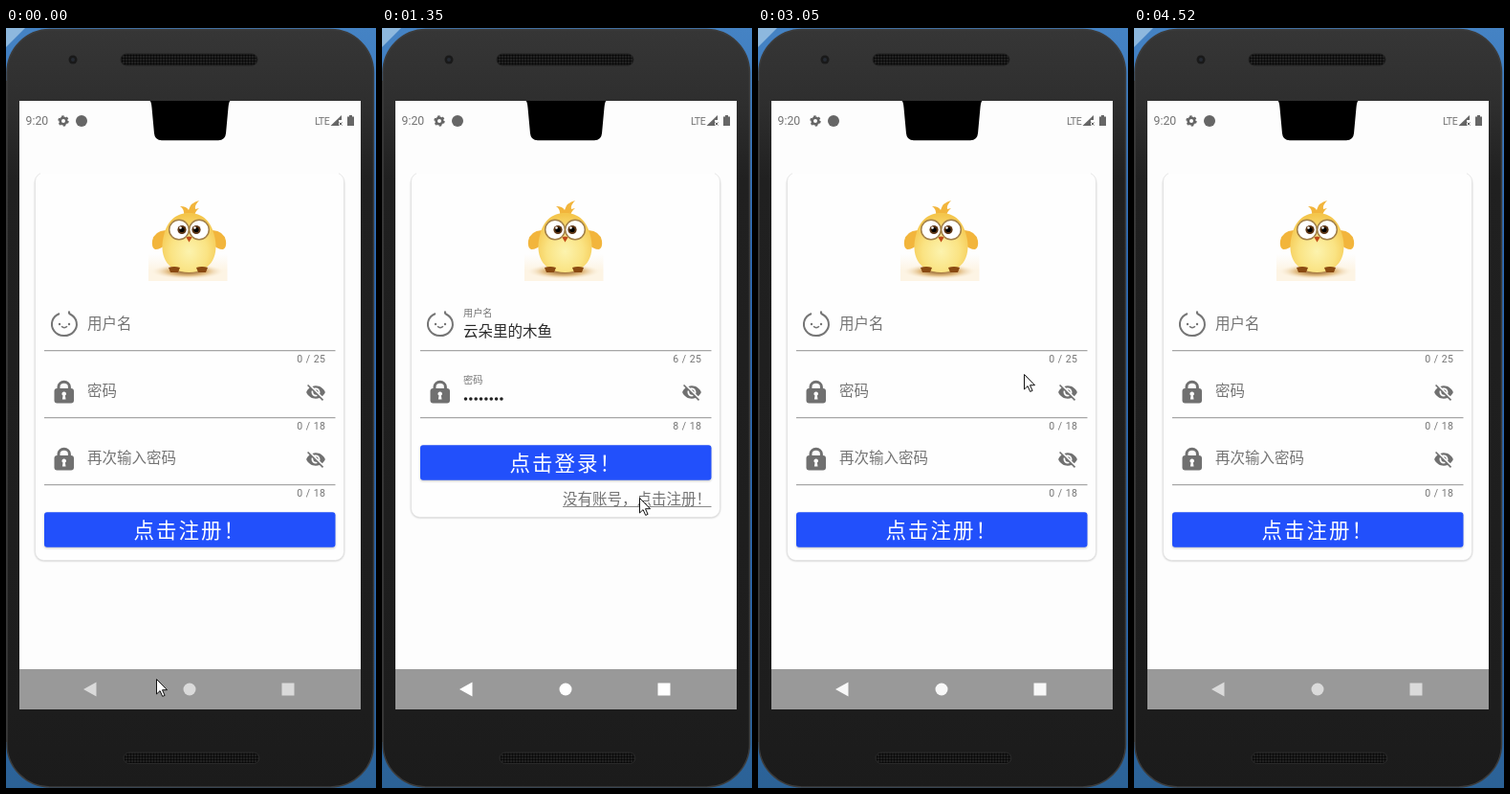
An HTML page that plays this animation: 387 px wide and 793 px high, repeating every 5.04 s.

```html
<!DOCTYPE html>
<html lang="zh-CN">
<head>
<meta charset="utf-8">
<title>Sign up</title>
<style>
html, body { margin: 0; width: 100%; height: 100%; overflow: hidden; background: #1c1c1c }
svg { display: block; width: 387px; height: 793px }
text { font-family: "Noto Sans CJK SC", "Noto Sans CJK", sans-serif; font-size: 15.5px; fill: #747474 }
.latin { font-family: Roboto, sans-serif }
.count { font: 10.5px Roboto, sans-serif; letter-spacing: .5px; text-anchor: end }
.btn { font-size: 21.5px; letter-spacing: 2px; fill: #fff }
.value { fill: #2a2a2a }
.line { stroke: #a6a6a6; stroke-width: 1.3 }
</style>
</head>
<body>
<svg viewBox="0 0 387 793">
  <defs>
    <linearGradient id="desk" x2="0" y2="1">
      <stop stop-color="#4583c4"/><stop offset=".3" stop-color="#2d6cb8"/>
      <stop offset=".8" stop-color="#2a68ae"/><stop offset="1" stop-color="#2c6296"/>
    </linearGradient>
    <linearGradient id="shell" x2="0" y2="1">
      <stop stop-color="#363636"/><stop offset=".1" stop-color="#2e2e2e"/>
      <stop offset=".2" stop-color="#202020"/><stop offset=".9" stop-color="#1d1d1d"/>
      <stop offset="1" stop-color="#1b1b1b"/>
    </linearGradient>
    <radialGradient id="fluff" cx=".5" cy=".65" r=".62">
      <stop stop-color="#fcf3ae"/><stop offset=".55" stop-color="#fae383"/><stop offset="1" stop-color="#f4c64c"/>
    </radialGradient>
    <radialGradient id="ground">
      <stop stop-color="#8a5a24"/><stop offset=".55" stop-color="#e2bd84"/><stop offset="1" stop-color="#fbefd9" stop-opacity="0"/>
    </radialGradient>
    <linearGradient id="cream" x2="0" y2="1">
      <stop stop-color="#fdf4e4" stop-opacity="0"/><stop offset=".6" stop-color="#fdf4e4"/>
    </linearGradient>
    <pattern id="mesh" width="3" height="3" patternUnits="userSpaceOnUse">
      <path d="M0 0h3v3H0z" fill="#292929"/><circle cx="1.5" cy="1.5" r="1.2" fill="#060606"/>
    </pattern>
    <filter id="soft" x="-5%" y="-5%" width="110%" height="110%"><feGaussianBlur stdDeviation="1"/></filter>
    <g id="lock">
      <path d="M55 377v-2.500a5.700 5.200 0 0 1 11.400 0v2.500" fill="none" stroke="#707070" stroke-width="3"/>
      <rect x="50.500" y="376" width="20.500" height="15.500" rx="3" fill="#707070"/>
      <path d="M60.700 379.500a2.200 2.200 0 0 1 1.200 4.100l.6 4h-3.600l.6-4a2.200 2.200 0 0 1 1.200-4.100z" fill="#fff"/>
    </g>
    <path id="hidden" transform="translate(313.2 369.2) scale(.9)" fill="#707070" d="M12 7c2.76 0 5 2.24 5 5 0 .65-.13 1.26-.36 1.83l2.92 2.92c1.51-1.26 2.7-2.89 3.43-4.75-1.73-4.39-6-7.5-11-7.5-1.4 0-2.74.25-3.98.7l2.16 2.16C10.74 7.13 11.35 7 12 7zM2 4.27l2.74 2.74C3.08 8.3 1.78 10.02 1 12c1.73 4.39 6 7.5 11 7.5 1.55 0 3.03-.3 4.38-.84L19.73 22 21 20.73 3.27 3 2 4.27zM7.53 9.8l1.55 1.55c-.05.21-.08.43-.08.65 0 1.66 1.34 3 3 3 .22 0 .44-.03.65-.08l1.55 1.55c-.67.33-1.41.53-2.2.53-2.76 0-5-2.24-5-5 0-.79.2-1.53.53-2.2zm4.31-.78l3.15 3.15.02-.16c0-1.66-1.34-3-3-3z"/>
    <g id="secret">
      <use href="#lock"/><use href="#hidden"/>
      <path class="line" d="M40 406.700h304.500"/>
    </g>
    <g id="button">
      <rect x="40" y="506" width="304.500" height="37" rx="3" fill="#000" opacity=".2" filter="url(#soft)"/>
      <rect x="40" y="505.300" width="304.500" height="36.500" rx="3" fill="#2250fb"/>
    </g>
  </defs>

  <!-- phone -->
  <path d="M0 0h387v793H0z" fill="url(#desk)"/>
  <path d="M0 0h20L0 20z" fill="#8db8de"/>
  <path d="M0 55h2v690H0z" fill="#303030"/>
  <rect x="1" y="1.500" width="383.500" height="790.500" rx="45" fill="url(#shell)" stroke="#3c3c3c" stroke-width="1.500"/>
  <circle cx="70" cy="33" r="4.500" fill="#191919"/><circle cx="70" cy="33" r="2" fill="#262b33"/>
  <rect x="120" y="27" width="143" height="12" rx="6" fill="url(#mesh)" stroke="#202020"/>
  <rect x="123" y="756" width="142" height="11.500" rx="5.700" fill="url(#mesh)" stroke="#2a2a2a"/>

  <!-- screen -->
  <path d="M14 76h357v635H14z" fill="#fdfdfd"/>
  <path d="M150.500 76q1.500 1 2 7l2.500 27q.7 7.300 8 7.300h59q7.300 0 8-7.300l2.500-27q.5-6 2-7z"/>
  <text class="latin" x="20.500" y="101" style="font-size:12.300px">9:20</text>
  <g fill="#666">
    <circle cx="60" cy="97" r="3.300" fill="none" stroke="#666" stroke-width="2.600"/>
    <circle cx="60" cy="97" r="4.800" fill="none" stroke="#666" stroke-width="1.800" stroke-dasharray="2.500 2.526"/>
    <circle cx="79" cy="97" r="6"/>
    <path d="M351 91v5h-3v6h-8.500z"/><path d="M348.500 98.500l3 3m0-3l-3 3" stroke="#666"/>
    <path d="M357 92.500h2v-1.500h3v1.500h2V102h-7z"/>
  </g>
  <text class="latin" x="323" y="101" style="font-size:10.500px;letter-spacing:-.4px">LTE</text>

  <!-- card -->
  <rect id="shade" x="30.500" y="153" width="323" rx="9" fill="#000" opacity=".28" filter="url(#soft)"/>
  <rect id="card" x="30.500" y="151" width="323" rx="9" fill="#fefefe" stroke="#e2e2e2" stroke-width=".8"/>
  <path d="M36 150.500h312" stroke="#fdfdfd" stroke-width="3"/>

  <!-- chick -->
  <path d="M149 236h82.500v28H149z" fill="url(#cream)"/>
  <ellipse cx="190" cy="254" rx="38" ry="8" fill="url(#ground)"/>
  <g fill="#f2b53c">
    <path d="M167 211q-12 1-14 11q-1 7 3 9q6 0 12-6zM216 211q12 1 14 11q1 7-3 9q-6 0-12-6z"/>
    <path d="M186 196q1-7-4-10q7 0 9 4q2-8 11-10q-5 5-4 9l4-1q-5 4-5 9z"/>
  </g>
  <path d="M191.500 193c15 0 23 10 26 22c6 20-1 40-26 40s-32-20-26-40c3-12 11-22 26-22z" fill="url(#fluff)"/>
  <path d="M170 250q6-2 12 0l-2 5h-8zM199 250q6-2 12 0l-2 5h-8z" fill="#8a4a12"/>
  <g fill="#fff" stroke="#a38048" stroke-width="1.500">
    <circle cx="181" cy="210.500" r="10.300"/><circle cx="202" cy="210.500" r="10.300"/>
  </g>
  <circle cx="184" cy="210.500" r="4.600" fill="#5b3414"/><circle cx="199" cy="210.500" r="4.600" fill="#5b3414"/>
  <circle cx="184" cy="210.500" r="2.600"/><circle cx="199" cy="210.500" r="2.600"/>
  <circle cx="182.500" cy="208.500" r="1.300" fill="#fff"/><circle cx="197.500" cy="208.500" r="1.300" fill="#fff"/>
  <path d="M188.500 218.500q3-2 6 0l-3 5z" fill="#c04a18"/>

  <!-- shared fields -->
  <g fill="none" stroke="#757575" stroke-width="2">
    <path d="M56 298a13 12 0 1 0 11 .5q-2-1-.5-3"/>
    <path d="M58 311.300q3 2.800 6 0" stroke-width="1.500"/>
  </g>
  <circle cx="56" cy="309" r="1.200" fill="#757575"/><circle cx="66" cy="309" r="1.200" fill="#757575"/>
  <path class="line" d="M40 336.700h304.500"/>
  <use href="#secret"/>
  <text id="userHint" x="85">用户名</text>
  <text id="passHint" x="85">密码</text>
  <text id="userCount" class="count" x="334.500" y="349"></text>
  <text id="passCount" class="count" x="334.500" y="419"></text>

  <g id="register">
    <use href="#secret" y="70"/>
    <text x="85" y="454">再次输入密码</text>
    <text class="count" x="334.500" y="489">0 / 18</text>
    <use href="#button"/>
    <text class="btn" x="133.500" y="531.700">点击注册！</text>
  </g>
  <g id="login">
    <text class="value" x="85" y="322">云朵里的木鱼</text>
    <path d="M87.500 387h39" stroke="#222" stroke-width="3.600" stroke-linecap="round" stroke-dasharray="0 5.350"/>
    <use href="#button" y="-70"/>
    <text class="btn" x="133.500" y="461.700">点击登录！</text>
    <text x="189" y="497">没有账号，点击注册！</text>
    <path d="M189 499.500h155.500" stroke="#8a8a8a"/>
  </g>

  <!-- navigation bar -->
  <path d="M14 669h357v42H14z" fill="#999"/>
  <rect id="ripple" y="669" height="42" rx="21" fill="#fff"/>
  <g id="nav">
    <path d="M81 690l13.500-7.500v15z"/><circle cx="192" cy="690" r="6.500"/><path d="M288.500 683.500h13v13h-13z"/>
  </g>
  <path id="cursor" d="M.5 .5v15.500l3.600-3.400 2.600 5.800 2.400-1-2.600-5.700h5z" fill="#fff" stroke="#111"/>
</svg>
<script>
const LOOP = 5040, OPEN_LOGIN = 670, OPEN_REGISTER = 1750;
// time, x, y
const path = [
  [40, 157, 679], [200, 132, 690], [390, 94, 688], [820, 94, 688], [930, 175, 640], [1040, 259, 553],
  [1100, 262, 548], [1230, 274, 512], [1350, 269, 490], [2100, 269, 490], [2190, 109, 455],
  [2440, 109, 455], [2470, 109, 451], [2700, 200, 398], [2920, 277, 357], [3030, 277, 357],
  [3050, 278, 361], [3170, 286, 352], [3350, 235, 328], [3540, 169, 320], [3640, 160, 317],
  [3710, 140, 306], [3760, 146, 311], [3900, 235, 400], [4030, 307, 520], [4140, 278, 646],
  [4170, 277, 655], [4340, 260, 720], [4520, 242, 795]
];
const $ = id => document.getElementById(id);
const set = (id, attrs) => { for (const k in attrs) $(id).setAttribute(k, attrs[k]); };
const clamp = v => Math.max(0, Math.min(1, v));
const part = (t, a, b) => clamp((t - a) / (b - a));
const mix = (a, b, p) => a + (b - a) * p;

function cursorAt(t) {
  const i = path.findIndex(k => k[0] > t);
  if (i < 0) return path[path.length - 1].slice(1);
  if (!i) return path[0].slice(1);
  const [a, b] = [path[i - 1], path[i]], p = part(t, a[0], b[0]);
  return [mix(a[1], b[1], p), mix(a[2], b[2], p)];
}

function draw(t) {
  const login = t >= OPEN_LOGIN && t < OPEN_REGISTER;
  const bottom = login ? 510.5 : 555.5;
  set('card', { height: bottom - 151 });
  set('shade', { height: bottom - 152.5 });
  $('login').style.display = login ? '' : 'none';
  $('register').style.display = login ? 'none' : '';
  $('userCount').textContent = (login ? 6 : 0) + ' / 25';
  $('passCount').textContent = (login ? 8 : 0) + ' / 18';

  const lift = login ? 1 - (1 - part(t, 680, 847)) ** 2 : 0;
  [['userHint', 0], ['passHint', 70]].forEach(([id, dy]) => {
    $(id).style.fontSize = mix(15.5, 10.2, lift) + 'px';
    set(id, { y: mix(314, 301, lift) + dy });
  });

  const grow = mix(.4, 1, part(t, 530, 660));
  set('ripple', {
    x: 89 - 46 * grow, width: 92 * grow,
    opacity: t < 540 ? 0 : .1 * (1 - part(t, 780, 1040))
  });
  const glow = t < 540 ? 0 : 1 - part(t, 2900, 3750);
  const shade = Math.round(mix(218, 255, glow));
  set('nav', { fill: `rgb(${shade},${shade},${shade})` });
  set('cursor', { transform: `translate(${cursorAt(t)})` });
}

let start;
function frame(now) {
  start ??= now;
  draw((now - start) % LOOP);
  requestAnimationFrame(frame);
}
draw(0);
requestAnimationFrame(frame);
</script>
</body>
</html>
```
